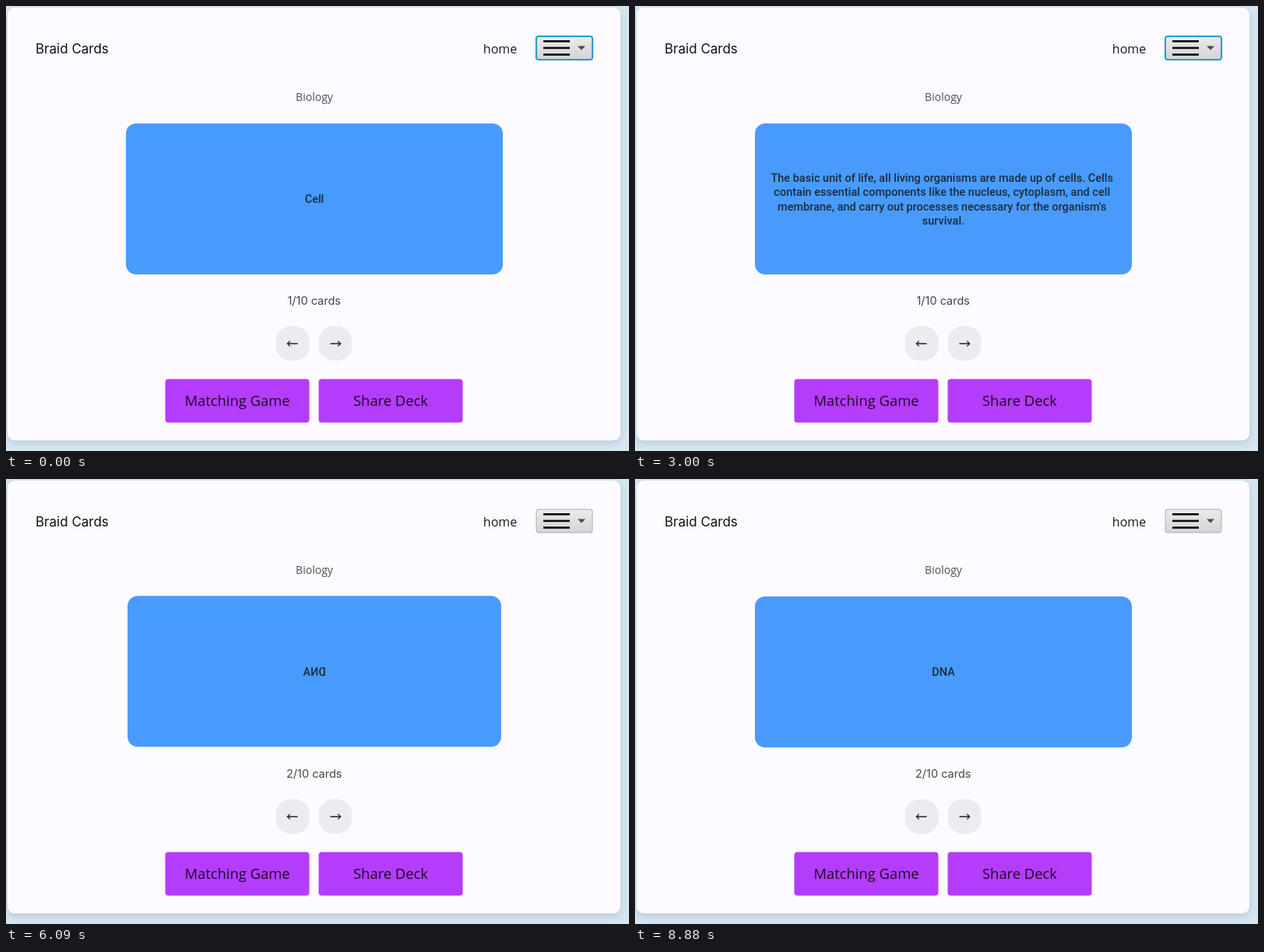
An HTML page with a canvas for the animation above (9.39 s loop, 800 px wide and 572 px high).

```html
<!DOCTYPE html>
<html lang="en">
<head>
<meta charset="utf-8">
<title>Flash cards</title>
<style>
  html, body { margin: 0; width: 100%; height: 100%; overflow: hidden; background: #d6e5f0; }
  canvas { display: block; }
</style>
</head>
<body>
<canvas id="stage" width="800" height="572"></canvas>
<script>
const ctx = document.getElementById('stage').getContext('2d');

const LOOP = 9390;
const FLIP = 500;
const NEXT_CARD = 4600;
const LIFT = 24;
const CARD = { x: 396, y: 248, w: 484, h: 194 };

const INTER = 'Inter, sans-serif';
const OPEN = '"Open Sans", sans-serif';
const ROBOTO = 'Roboto, sans-serif';

// A trailing space is kept where a line wraps.
const DECK = [
  {
    term: ['Cell'],
    meaning: [
      'The basic unit of life, all living organisms are made up of cells. Cells ',
      'contain essential components like the nucleus, cytoplasm, and cell ',
      "membrane, and carry out processes necessary for the organism's ",
      'survival.'
    ],
    flips: [1800, 3662]
  },
  {
    term: ['DNA'],
    meaning: [
      'Deoxyribonucleic acid, a molecule that carries the genetic instructions ',
      'used in the growth, development, and functioning of all living ',
      'organisms. It is composed of two strands that coil around each other ',
      'to form a double helix.'
    ],
    flips: [6033, 7300]
  }
];

function box(x, y, w, h, r, fill) {
  ctx.beginPath();
  ctx.roundRect(x, y, w, h, r);
  ctx.fillStyle = fill;
  ctx.fill();
}

function label(str, x, y, font, color, align = 'center') {
  ctx.font = font;
  ctx.textAlign = align;
  ctx.fillStyle = color;
  ctx.fillText(str, x, y);
}

// Ease in and out over the first and last fifth, linear between.
function ease(t) {
  if (t < 0.2) return 3.125 * t * t;
  if (t > 0.8) return 1 - 3.125 * (1 - t) * (1 - t);
  return 1.25 * t - 0.125;
}

function drawPanel() {
  ctx.fillStyle = '#d6e5f0';
  ctx.fillRect(0, 0, 800, 572);
  ctx.save();
  ctx.shadowColor = 'rgba(60, 90, 120, 0.22)';
  ctx.shadowBlur = 9;
  ctx.shadowOffsetY = 3;
  box(2, 2, 787, 556.5, 9, '#fdfbff');
  ctx.restore();
}

function drawMenu(focused) {
  const fill = ctx.createLinearGradient(0, 39, 0, 69);
  fill.addColorStop(0, '#ececec');
  fill.addColorStop(1, '#d2d3d4');
  if (focused) {
    box(679.5, 37.5, 75, 33, 5, '#c4e6f3');
    box(680, 38, 74, 32, 4, '#2b9fce');
    box(682, 40, 70, 28, 2, fill);
  } else {
    box(680.5, 38.5, 73, 31, 4, '#aeb0b2');
    box(681.5, 39.5, 71, 29, 3, fill);
  }
  ctx.fillStyle = '#0a0a0a';
  for (const y of [44, 52.6, 61.2]) ctx.fillRect(690, y, 34, 2.6);
  ctx.beginPath();
  ctx.moveTo(734, 51.5);
  ctx.lineTo(744, 51.5);
  ctx.lineTo(739, 56.5);
  ctx.fillStyle = '#4a4a4a';
  ctx.fill();
}

function drawArrow(x, dir) {
  const y = 434;
  box(x - 21.5, 411.5, 43, 44.5, 19, '#edebef');
  ctx.beginPath();
  ctx.moveTo(x - 6.5 * dir, y);
  ctx.lineTo(x + 6.5 * dir, y);
  ctx.moveTo(x + 3.2 * dir, y - 3.4);
  ctx.lineTo(x + 6.7 * dir, y);
  ctx.lineTo(x + 3.2 * dir, y + 3.4);
  ctx.strokeStyle = '#222';
  ctx.lineWidth = 1.3;
  ctx.stroke();
}

function drawButton(x, str) {
  box(x, 479.5, 185, 56, 4, '#b43dfc');
  label(str, x + 92.5, 513.5, '18.4px ' + OPEN, '#1d0a2b');
}

// Each flip turns from 180 to 0 degrees and swaps the side halfway.
function cardPose(card, time) {
  let angle = 0;
  let swaps = 0;
  for (const start of card.flips) {
    const t = (time - start) / FLIP;
    if (t < 0) continue;
    if (t >= 0.5) swaps++;
    if (t < 1) angle = Math.PI * (1 - ease(t));
  }
  return { angle, lines: swaps % 2 ? card.meaning : card.term };
}

function drawCard(card, time) {
  const { angle, lines } = cardPose(card, time);
  const lift = LIFT * Math.pow(Math.abs(Math.sin(angle)), 1.7);
  ctx.save();
  ctx.translate(CARD.x, CARD.y - lift);
  ctx.scale(Math.cos(angle), 1);
  box(-CARD.w / 2, -CARD.h / 2, CARD.w, CARD.h, 13, '#489bfd');
  lines.forEach((line, i) => {
    const y = 5.4 + (i - (lines.length - 1) / 2) * 18.2;
    label(line, 0, y, '500 14.5px ' + ROBOTO, '#1b2b40');
  });
  ctx.restore();
}

function draw(time) {
  const index = time < NEXT_CARD ? 0 : 1;
  drawPanel();
  label('Braid Cards', 38, 61, '17px ' + INTER, '#111', 'left');
  label('home', 634.5, 60.5, '16px ' + OPEN, '#1c1c1c');
  drawMenu(index === 0);
  label('Biology', 396, 122, '14px ' + OPEN, '#505052');
  label(`${index + 1}/10 cards`, 395.7, 383.6, '14.5px ' + INTER, '#444446');
  drawArrow(368, -1);
  drawArrow(423, 1);
  drawButton(204.5, 'Matching Game');
  drawButton(401.5, 'Share Deck');
  drawCard(DECK[index], time);
}

const begin = performance.now();
function tick() {
  draw((performance.now() - begin) % LOOP);
  requestAnimationFrame(tick);
}
tick();
</script>
</body>
</html>
```
